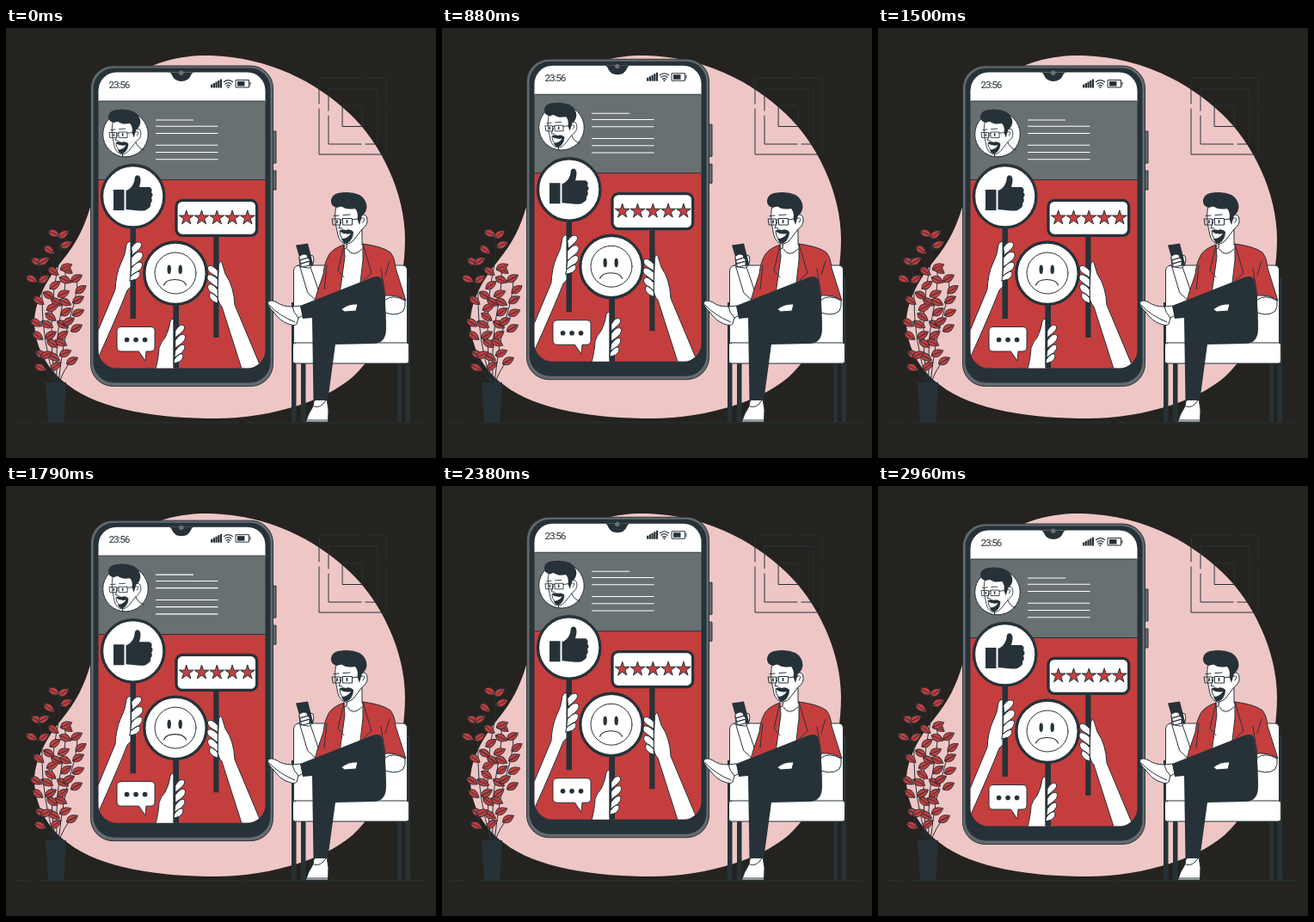
Recreate the animation shown at these times as an HTML page. Size 500x500 px, loop 3 s.

```html
<!DOCTYPE html>
<html lang="en">
<head>
<meta charset="utf-8">
<title>Feedback</title>
<style>
  html, body { margin: 0; width: 100%; height: 100%; overflow: hidden; background: #24231f; }
  svg { display: block; width: 100%; height: 100%; }
  .line { fill: none; stroke: #263238; stroke-linecap: round; stroke-linejoin: round; }
  .dark { fill: #263238; }
  .white { fill: #fff; stroke: #263238; stroke-linejoin: round; stroke-linecap: round; }
  .red { fill: #c53e3e; stroke: #263238; stroke-linejoin: round; }
  .grey { fill: #646a6d; stroke: #263238; }
  .clock { font: 11.8px Roboto, "Liberation Sans", sans-serif; letter-spacing: -1.1px; fill: #263238; }
</style>
</head>
<body>
<svg viewBox="0 0 500 500">
  <defs>
    <clipPath id="screen">
      <rect x="107.500" y="51.500" width="194" height="344" rx="21"/>
    </clipPath>
    <g id="head">
      <path class="white" d="M384 207C382 215 383 220 383 226L385 236Q386 246 392 250Q398 253 404 247L414 234Q421 229 420 222Q419 215 413 218L410 209Z"/>
      <path class="dark" d="M385 209Q377 207 378 200Q379 194 386 192Q400 189 411 194Q419 199 419.500 208Q419 215 414 218L411 229L408.500 222Q410 215 406 210Q395 212 390 207Z"/>
      <path class="dark" d="M387 236Q391 233 395 235Q400 233 404 237Q404 243 400 248Q396 252 392 249L390 245Q397 245 401 239Q394 241 387 236Z"/>
      <path class="line" d="M379.500 222H388.500V229H380.500ZM391.500 221.500H402.500V229H392ZM388.500 223H391.500M402.500 223L415 221M390 225L387 232.500L391 233M388 237Q388 242 391 245M381 218.500L387 218M392 217.500L400 217M416 221Q418 222 415 226"/>
      <path d="M385 223.500V227M396.500 223V227" stroke="#263238" stroke-width="1.700"/>
    </g>
  </defs>

  <path fill="#eec6c6" d="M98 208C110 165 103 92 145 58C172 38 208 31 238 32C305 34 360 62 400 100C436 134 464 192 464 245C464 300 446 361 409 400C379 432 309 454 244 454C180 454 110 445 72 415C48 398 33 370 33 341C34 316 48 292 65 271C82 250 91 232 98 208Z"/>

  <path class="line" d="M364 88V58H411M416 58H442V87M442 92V147H364V94M375 96V70H432V135H418M413 135H375V102M391.500 90H414V114.500H391.500Z"/>
  <path class="line" d="M9 459H28M41 459H271M276 459H456M462 459H488"/>

  <g id="plant">
    <path class="line" d="M57 413Q42 360 42 320T37 274M57 413Q48 340 59 285Q65 262 60 240M59 413Q57 360 65 325Q70 300 69 279M61 413Q66 365 75 335Q83 310 83 292M58 413Q45 400 40 380M62 413Q66 398 77 386M60 255L70 251M44 340L36 343"/>
    <g id="leaves"></g>
    <path class="dark" d="M46 412H70L67.500 459H49Z"/>
  </g>

  <g id="phone">
    <path class="grey" d="M309 120H314V157H309ZM309 166H314V188H309Z"/>
    <rect class="grey" x="98.500" y="44" width="212" height="372.500" rx="26"/>
    <rect class="dark" x="101.500" y="46.500" width="206" height="366" rx="24"/>
    <g clip-path="url(#screen)">
      <path fill="#fff" d="M107 51H302V86H107Z"/>
      <path fill="#697072" d="M107 85H302V177H107Z"/>
      <path fill="#c53e3e" d="M107 176.500H302V396H107Z"/>
      <path class="line" d="M107 85H302M107 176.500H302"/>
      <path class="dark" d="M186 51Q192 51 193 55Q196 62 204 62Q212 62 215 55Q216 51 222 51Z"/>
    </g>
    <circle cx="203.800" cy="52.300" r="2.700" fill="#697072"/>

    <text class="clock" x="119.400" y="69.800">23:56</text>
    <path d="M239.200 69.500V65.500M241.900 69.500V64M244.600 69.500V62.500M247.300 69.500V61M250 69.500V59.500" stroke="#263238" stroke-width="2.200"/>
    <path class="line" d="M253.500 62.500Q258.500 58.500 263.500 62.500M255 65Q258.500 62 262 65M256.500 67.200Q258.500 65.500 260.500 67.200" stroke-width="1.200"/>
    <circle class="dark" cx="258.500" cy="69" r="1"/>
    <path class="line" d="M267.500 60.500H282.500V69H267.500ZM284 63V66.500"/>
    <path class="dark" d="M269 62H277.500V67.500H269Z"/>

    <circle class="white" cx="139" cy="123.500" r="26.300"/>
    <use href="#head" transform="translate(119 94.500) scale(.9 .87) translate(-378 -191)"/>
    <path class="line" d="M135.500 146V149M151 133Q153 139 160 142"/>
    <path d="M174 107H218M174 114.300H246.500M174 122.500H246.500M174 136.300H246.500M174 144.500H246.500M174 152.700H246.500" stroke="#fff" stroke-width="1.100"/>

    <g clip-path="url(#screen)">
      <!-- left arm and thumb sign -->
      <path class="white" d="M107 352L127 304Q128 286 133 275Q139 264 140 252Q143 246 146 250V300L141 305Q130 333 107 384Z"/>
      <path class="dark" d="M144.500 230H151V338H144.500Z"/>
      <path class="white" d="M146 255Q152 246 157 250Q159 253 154 258L147 264ZM146 267Q153 258 158 261Q161 265 156 270L146 278ZM146 279Q153 270 158 273Q160 277 155 282L145 288ZM145 289Q152 281 156 284Q157 288 152 292L144 294Z"/>

      <!-- right arm and stars sign -->
      <path class="dark" d="M241.300 239H247.500V360H241.300Z"/>
      <path class="white" d="M247.500 275Q249 269 251 273L255 286Q265 300 266 322L297 396H274L251 324Q246 319 246 310Z"/>
      <path class="white" d="M246 282Q239 274 235 277Q233 281 238 285L246 290ZM246 292Q238 284 234 288Q232 292 238 296L246 302ZM246 304Q239 295 235 299Q233 303 239 308L246 313ZM246 314Q240 305 237 309Q235 313 241 318L246 320Z"/>

      <!-- middle arm and sad sign -->
      <path class="white" d="M174 397Q178 380 178 372Q180 365 185 360Q190 350 191 341Q193 336 196 340V397Z"/>
      <path class="dark" d="M194.300 319H201V397H194.300Z"/>
      <path class="white" d="M197 352Q202 343 207 346Q209 350 204 354L197 360ZM197 363Q203 354 208 357Q210 361 205 366L197 372ZM197 375Q203 366 208 369Q209 373 204 378L196 383ZM196 385Q202 376 206 380Q207 384 202 388L195 390Z"/>
    </g>

    <g stroke-width="3.300">
      <circle class="white" cx="147.700" cy="195.700" r="36.200"/>
      <rect class="white" x="198" y="200.300" width="93.700" height="41" rx="7"/>
      <circle class="white" cx="197" cy="285.200" r="36.200"/>
    </g>
    <path class="dark" d="M125 188H137.500V212H125ZM139.500 189Q146 187 149 179L150 173Q152 170 155 172Q158 175 155 185H167Q171 187 169 191Q172 194 169 197.500Q171 201 168 204Q169 208 165 210Q163 213 155 212.500L139.500 211Z"/>
    <g id="stars"></g>
    <circle class="line" cx="197" cy="285" r="24"/>
    <path class="line" d="M183.500 299Q186 292.500 196.500 292.500T209.500 299" stroke-width="1.200"/>
    <ellipse class="dark" cx="189.700" cy="280.800" rx="2.200" ry="5.300"/>
    <ellipse class="dark" cx="202.700" cy="280.800" rx="2.200" ry="5.300"/>
    <path class="white" d="M134 347.500H168Q173 347.500 173 352.500V371Q173 376 168 376H163L162 387L154.500 376H134Q129 376 129 371V352.500Q129 347.500 134 347.500Z"/>
    <path d="M140.500 362.500H140.600M151 362.500H151.100M161.500 362.500H161.600" stroke="#263238" stroke-width="5.600" stroke-linecap="round"/>
  </g>

  <g id="man">
    <path class="dark" d="M332 319H337.500V459H332ZM343 388H348.500V459H343ZM455 388H460V459H455ZM464.500 290H470V459H464.500Z"/>
    <path class="white" d="M340 276H462Q467 277 466.500 283V368H334.500V282Q335 277 340 276Z"/>
    <rect class="white" x="333.500" y="366" width="135" height="24" rx="3"/>

    <!-- torso -->
    <path class="white" d="M397 247L396 256L386 260L382 332H424L420 256L414 252V235Z"/>
    <path class="white" d="M342 277L353 275L363 304L364 320L351 308Z"/>
    <path class="red" d="M393 252Q381 256 376 263Q370 273 369 286L362 307Q359 318 357 323L385 331L394 266Z"/>
    <path class="red" d="M415 251Q438 254 447 261Q452 267 453 279L465 317Q456 310 441 311L438 328L409 322L415 270Z"/>
    <path class="line" d="M393 252L386 282L393 290M415 251L425 285L416 293M373 276L370 304M436 280L441 311M397 257Q403 268 414 257M446 271L441 287"/>
    <path class="white" d="M441 316Q450 309 464 317Q465 324 462 329Q458 333 450 333L440 331Z"/>

    <!-- hand with phone -->
    <path class="white" d="M342 277L341 267Q343 262 350 263L357 265Q360 274 353 279Z"/>
    <path class="dark" d="M337 252.500L351 250.500L357.500 276L352 277L349 264L341 266Z"/>
    <path class="white" d="M341 266Q345 261 350 264L351 267L342 270ZM342 270L351 267L354 271L343 274ZM343 274L353 271V276L344 278Z"/>

    <!-- legs and shoes -->
    <path class="white" d="M358 434L357 440Q351 449 348.500 458H374.500L375 444L372 425Z"/>
    <path class="line" d="M349 456H374M358 440Q366 443 372 433"/>
    <path class="white" d="M342 323L333 324Q321 324 315 319Q307 315 304.500 319Q304 323 311 330Q319 341 328 344Q336 347 338 344L340 337L346 334Z"/>
    <path class="line" d="M306 322Q318 335 336 342M333 324Q334 331 340 337"/>
    <path class="dark" d="M342 323L426 290Q434 287 437 292Q442 312 442 350Q442 366 428 367L383 368L375 427L373 433H357.500L356 337L345 338Z"/>
    <path class="white" d="M390 327Q398 320 409 321L407 329L394 330Z"/>
    <use href="#head"/>
  </g>
</svg>
<script>
  const byId = id => document.getElementById(id);

  const leftLeaves = [56,239, 50,258, 36,272, 30,292, 55,283, 50,311, 69,293, 38,317, 35,343, 48,345, 37,358,
    59,319, 69,319, 52,336, 41,380, 40,395, 54,367, 56,383, 64,366, 71,281, 66,345];
  const rightLeaves = [67,240, 70,252, 44,271, 44,292, 70,278, 82,291, 87,304, 67,309, 84,316, 70,330, 84,331,
    82,349, 57,299, 54,325, 52,357, 66,357, 47,380, 77,387, 58,393, 69,378, 73,341];

  function leafMarkup(points, angle) {
    let out = '';
    for (let i = 0; i < points.length; i += 2) {
      out += `<path class="red" stroke-width=".9" transform="translate(${points[i]} ${points[i + 1]}) rotate(${angle + i % 3 * 5})"
        d="M-7.500 0Q-2-8.500 7.500 0Q-2 8-7.500 0ZH5"/>`;
    }
    return out;
  }

  function starMarkup(cx, cy, radius) {
    const points = Array.from({ length: 10 }, (_, i) => {
      const r = i % 2 ? radius * .38 : radius, a = Math.PI * (i / 5 - .5);
      return `${cx + r * Math.cos(a)},${cy + r * Math.sin(a)}`;
    });
    return `<polygon class="red" points="${points.join(' ')}"/>`;
  }

  byId('leaves').innerHTML = leafMarkup(leftLeaves, 25) + leafMarkup(rightLeaves, -35);
  byId('stars').innerHTML = [0, 1, 2, 3, 4].map(i => starMarkup(209.700 + i * 17.8, 220.700, 8.800)).join('');

  // The phone floats 10px up and back at constant speed, stepped at 24 fps.
  const phone = byId('phone'), halfCycle = 750, fps = .024;
  const start = performance.now();

  function draw(now) {
    const elapsed = Math.max(0, now - start) % 3000;
    const time = (Math.floor((elapsed + 4) * fps) + .5) / fps;
    const phase = time / halfCycle % 2;
    const lift = 10 * (1 - Math.abs(1 - phase));
    phone.setAttribute('transform', `translate(0 ${(.3 - lift).toFixed(3)})`);
    requestAnimationFrame(draw);
  }
  draw(start);
</script>
</body>
</html>
```
